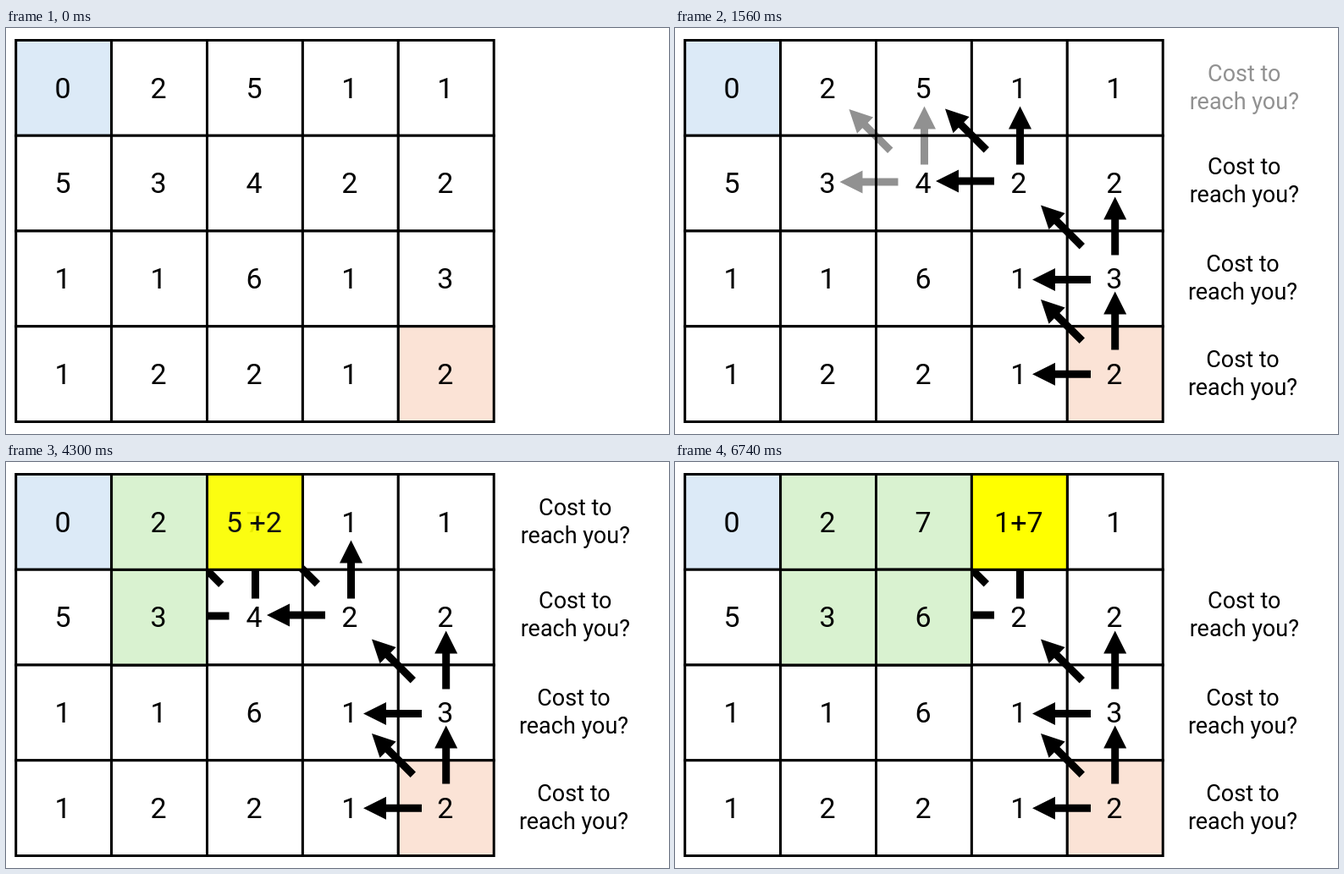
Write an HTML page that moves like this. It is 783x480 px and loops after 8000 ms.

```html
<!DOCTYPE html>
<html lang="en">
<head>
<meta charset="utf-8">
<title>Minimum cost path</title>
<style>
  html, body { margin: 0; width: 100%; height: 100%; overflow: hidden; background: #fff; }
  svg { display: block; width: 783px; height: 480px; }
  text { font-family: Roboto, "Liberation Sans", sans-serif; text-anchor: middle; white-space: pre; }
  .num { font-size: 34px; }
  .ask { font-size: 27px; }
  .cell { stroke: #000; stroke-width: 3; }
</style>
</head>
<body>
<svg id="stage" viewBox="0 0 783 480"></svg>
<script>
const LOOP = 8000, TICK = 60, FADE = 455;
const STARTS = [0, 4300, 6260];          // each run of changes ticks from here
const X0 = 11.7, Y0 = 14.5, W = 112.9, H = 112.75;
const BLUE = '#dceaf7', PEACH = '#fbe3d6', GREEN = '#d9f2d0', YELLOW = '#ffff00';
const COSTS = ['02511', '53422', '11613', '12212'];

const stage = document.getElementById('stage');

function add(parent, tag, attrs, label) {
  const el = document.createElementNS('http://www.w3.org/2000/svg', tag);
  for (const key in attrs) el.setAttribute(key, attrs[key]);
  if (label) el.textContent = label;
  parent.appendChild(el);
  return el;
}

function cell(parent, col, row, fill, label) {
  const x = X0 + col * W, y = Y0 + row * H;
  add(parent, 'rect', { class: 'cell', x, y, width: W, height: H, fill });
  add(parent, 'text', { class: 'num', x: x + W / 2 - 1, y: y + H / 2 + 11.7 }, label);
}

// Arrow with its tip at the origin, pointing left before rotation.
function arrow(parent, x, y, angle) {
  add(parent, 'path', {
    d: 'M0 0L27-13.5V-4.5H69V4.5H27V13.5Z',
    transform: `translate(${x} ${y}) rotate(${angle})`
  });
}

function question(parent, x, y) {
  add(parent, 'text', { class: 'ask', x, y }, 'Cost to');
  add(parent, 'text', { class: 'ask', x, y: y + 33 }, 'reach you?');
}

const parts = [];
function part(at, opts, draw) {
  const group = add(stage, 'g', {});
  draw(group);
  parts.push({ group, at, fade: 0, lead: 0, until: Infinity, ...opts });
}

COSTS.forEach((line, row) => [...line].forEach((n, col) => {
  const fill = row + col === 0 ? BLUE : row === 3 && col === 4 ? PEACH : '#fff';
  cell(stage, col, row, fill, n);
}));

// Tips of the left, diagonal and up arrows, then the question's place.
const asks = [
  { left: [422, 409.3], diag: [432, 321], up: [519.7, 311.5], text: [670.5, 400.7] },
  { left: [422, 297.5], diag: [432, 209.5], up: [519.7, 199.5], text: [670.5, 287.9] },
  { left: [308, 181], diag: [319, 95.5], up: [407.5, 92.5], text: [672.3, 173] },
  { left: [194.5, 182], diag: [205.5, 96], up: [294.5, 92.5], text: [672.3, 63] }
];
asks.forEach((ask, i) => {
  const at = i * FADE, last = i === asks.length - 1;
  part(at, { fade: FADE }, g => {
    arrow(g, ...ask.left, 0);
    arrow(g, ...ask.diag, 45);
    arrow(g, ...ask.up, 90);
  });
  part(at, { fade: FADE, until: last ? 6260 : Infinity }, g => question(g, ...ask.text));
});

// Answers: [time, column, row, fill, label, fade, lead]
[
  [4 * FADE, 1, 1, YELLOW, '3+0', FADE, 0],
  [5 * FADE, 1, 1, GREEN, '3', FADE, 0],
  [2760, 1, 0, GREEN, '2', 0, 0],
  [2760, 2, 0, YELLOW, '5 +2', 0, 0],
  [4300, 2, 0, GREEN, '7', FADE, 35],
  [4720, 2, 1, YELLOW, '4+2', 0, 0],
  [6260, 2, 1, GREEN, '6', FADE, 35],
  [6740, 3, 0, YELLOW, '1+7', 0, 0]
].forEach(([at, col, row, fill, label, fade, lead]) =>
  part(at, { fade, lead }, g => cell(g, col, row, fill, label)));

function opacity(p, t) {
  if (t < p.at || t >= p.until) return 0;
  return p.fade ? Math.min(1, (t - p.at + p.lead) / p.fade) : 1;
}

function render(now) {
  const time = now % LOOP;
  const base = STARTS.filter(s => s <= time).pop();
  const t = base + Math.floor((time - base) / TICK) * TICK;
  for (const p of parts) {
    const a = opacity(p, t);
    p.group.style.display = a ? '' : 'none';
    p.group.style.opacity = a;
  }
}

const begin = performance.now();
function loop() {
  render(performance.now() - begin);
  requestAnimationFrame(loop);
}
loop();
</script>
</body>
</html>
```
